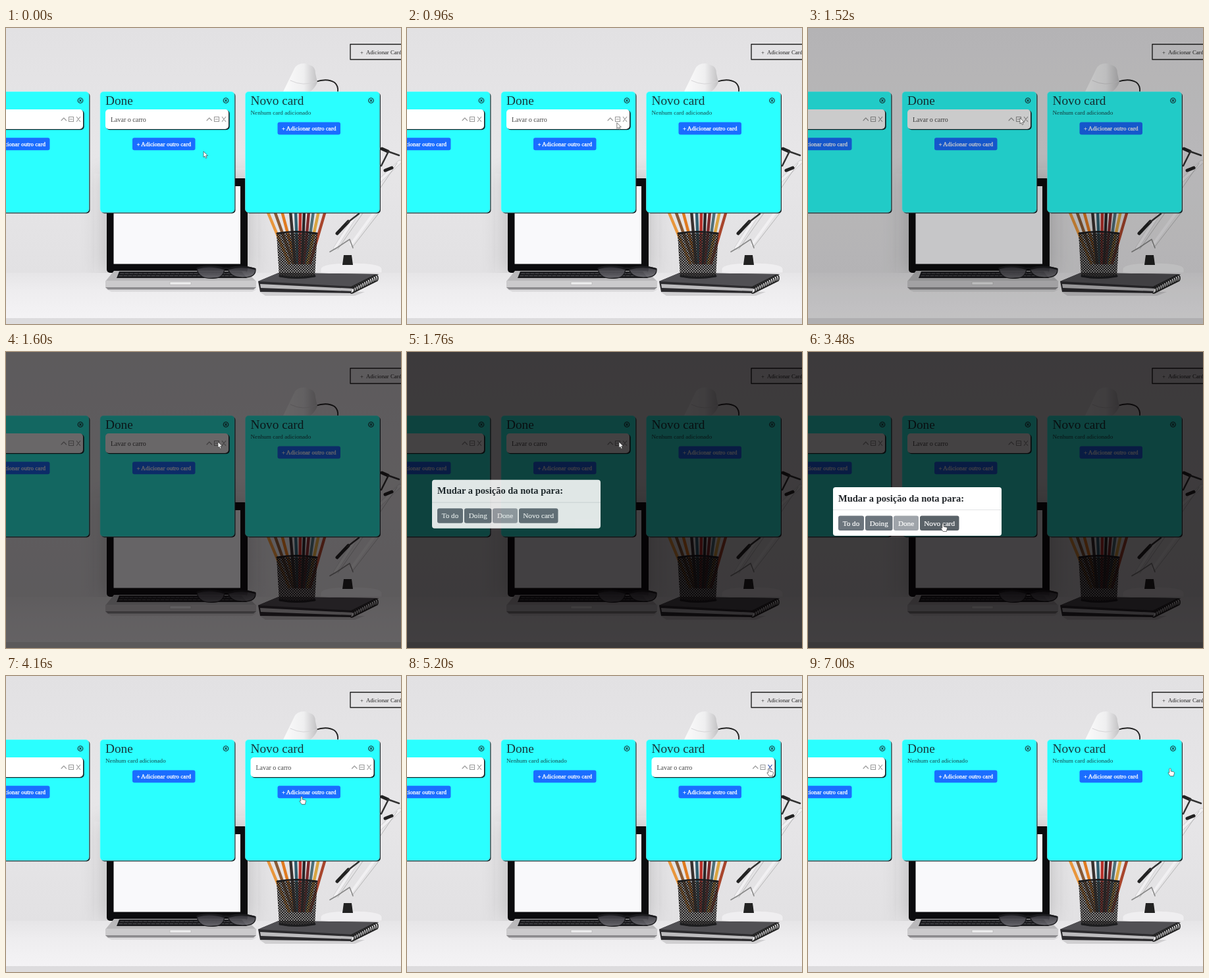
These frames come from a looping animation (600x451 px, 7.52 s). An HTML page:

```html
<!DOCTYPE html>
<html lang="pt">
<head>
<meta charset="utf-8">
<style>
html, body { margin: 0; width: 100%; height: 100%; overflow: hidden }
svg { display: block; width: 100%; height: 100%; font-family: "Liberation Serif", serif }
.line { fill: none; stroke-linecap: round; stroke-linejoin: round }
</style>
</head>
<body>
<svg id="stage" viewBox="0 0 600 451">
  <defs>
    <linearGradient id="wall" x2="0" y2="1"><stop stop-color="#e2e1e3"/><stop offset=".5" stop-color="#e7e6e8"/><stop offset="1" stop-color="#e2e1e3"/></linearGradient>
    <linearGradient id="desk" x2="0" y2="1"><stop stop-color="#e6e5e7"/><stop offset=".35" stop-color="#eeedef"/><stop offset="1" stop-color="#f5f4f6"/></linearGradient>
    <linearGradient id="shade"><stop stop-color="#fbfbfb"/><stop offset=".6" stop-color="#efeff0"/><stop offset="1" stop-color="#c2c1c3"/></linearGradient>
    <linearGradient id="lens" x2="0" y2="1"><stop stop-color="#333238"/><stop offset="1" stop-color="#6b6a70"/></linearGradient>
    <filter id="blur" x="-30%" y="-30%" width="160%" height="160%"><feGaussianBlur stdDeviation="14"/></filter>
    <pattern id="mesh" width="4" height="4" patternUnits="userSpaceOnUse"><path d="M0 0L4 4M4 0L0 4" stroke="#222" stroke-width="1"/></pattern>
  </defs>

  <g id="photo">
    <path fill="url(#wall)" d="M0 0H600V380H0z"/>
    <path fill="#444" fill-opacity=".17" filter="url(#blur)" d="M143 222H374V372H143z"/>
    <path fill="url(#desk)" d="M0 373H600V451H0z"/>
    <path fill="#dddcde" d="M0 442H600V451H0z"/>

    <!-- lamp -->
    <path class="line" stroke="#222" stroke-width="1.8" d="M470 82Q488 76 499 83Q505 88 504 97"/>
    <path fill="url(#shade)" d="M421 97L438 62Q442 53 455 54L465 58Q470 61 470 69L473 83Q469 92 462 97z"/>
    <path class="line" stroke="#d6d5d7" d="M432 80Q452 90 472 81"/>
    <g class="line">
      <path stroke="#d4d3d5" stroke-width="6" d="M598 204L560 240L500 335"/>
      <path stroke="#f1f0f2" stroke-width="4" d="M598 204L560 240L500 335M566 272L524 330"/>
      <path stroke="#aaa" stroke-width=".8" d="M594 206L563 252L504 337M568 280L527 333"/>
      <path stroke="#222" stroke-width="5" d="M571 184L580 188M576 217L586 213M503 313L520 295"/>
      <path stroke="#333" stroke-width="2.5" d="M580 188L597 194M570 210L580 190M518 297L536 283"/>
      <path stroke="#888" stroke-width="1.6" d="M492 341L504 334L522 322L527 335"/>
    </g>
    <path fill="#efeef0" stroke="#dddcde" stroke-width=".6" d="M478 367Q480 358 524 358Q570 358 571 367V373H478z"/>
    <path fill="#222" d="M513 346H525L527 361H511z"/>

    <!-- laptop -->
    <path fill="#dcdbdd" d="M152 398H381L374 402H160z"/>
    <rect x="153" y="229" width="214" height="144" rx="5" fill="#0c0c0e"/>
    <path fill="#f9f9fb" d="M163.5 241H356V359.5H163.5z"/>
    <path fill="#b9b8ba" d="M164 370H364L380 386H151z"/>
    <path fill="#1c1c1f" d="M172 371H358L366 381H168z"/>
    <path class="line" stroke="#66666a" stroke-width=".7" stroke-dasharray="5 2" d="M174 374H356M172 377.5H360"/>
    <path fill="#cbcacc" d="M151 385H380V394Q380 398 374 398H157Q151 398 151 394z"/>
    <path fill="#8b8a8d" d="M151 395H380L376 398.5H155z"/>
    <path fill="#ededee" stroke="#aaa" stroke-width=".5" d="M249 387H281V391H249z"/>

    <!-- notebook -->
    <path fill="#d0cfd1" d="M385 402H545L530 408H394z"/>
    <path fill="#2c2b2e" d="M383 386L414 373L566 375L526 398L524 404L386 402z"/>
    <path fill="#515054" d="M383 386L414 373L566 375L530 394z"/>
    <path fill="#bcbbbd" d="M386 390L526 397V401L387 396z"/>
    <g id="spiral" class="line" stroke="#222" stroke-width="1.7"></g>

    <!-- glasses -->
    <g fill="url(#lens)" fill-opacity=".92" stroke="#1b1b1e" stroke-width="1.3">
      <path d="M290 366Q309 359 332 366Q331 380 318 381Q292 384 290 366z"/>
      <path d="M337 366Q358 360 379 367Q380 380 362 380Q340 381 337 366z"/>
      <path class="line" stroke-width="2.4" d="M291 366Q309 360 331 367Q334 365 338 367Q358 361 378 367"/>
    </g>

    <!-- pencils and cup -->
    <g id="pencils" class="line"></g>
    <path fill="#2a2523" fill-opacity=".5" d="M411 313H473L469 379Q441 384 415 379z"/>
    <path fill="url(#mesh)" d="M411 313H473L469 379Q441 384 415 379z"/>
    <path class="line" stroke="#1c1c1e" stroke-width="3" d="M412 313Q441 308 472 313M416 378Q441 383 469 378"/>
  </g>

  <path class="line" stroke="#222" stroke-width="1.4" d="M605 24.7H523V48H605"/>
  <text x="538" y="39.5" font-size="8.7" fill="#222">+</text>
  <text x="547" y="39.5" font-size="8.7" fill="#222">Adicionar Card</text>
  <g id="cards"></g>
  <rect id="backdrop" width="600" height="451" fill="#040002"/>
  <g id="modal">
    <rect x="38" y="206" width="256" height="74" rx="4" fill="#fff"/>
    <text x="46" y="227.5" font-size="14.5" font-weight="700" fill="#212529">Mudar a posição da nota para:</text>
    <path stroke="#e3e4e6" d="M38 240.5H294"/>
    <g id="choices"></g>
  </g>
  <g id="cursor" fill="#fff" stroke="#333" stroke-width=".65" stroke-linejoin="round">
    <path id="arrow" d="M0 0V9L2 7.2L3.4 10.4L5 9.7L3.6 6.6H6.5z"/>
    <path id="hand" d="M-1.2 1Q0-.8 1.2 1V4.6L5.6 5.6Q6.7 6 6.5 7.4L5.6 10.6V12H.2L-3 7.4Q-3 5.9-1.2 6.8z"/>
  </g>
</svg>
<script>
const LOOP = 7520, OPEN = 1480, PICK = 3500, REMOVE = 5600;
const $ = id => document.getElementById(id);
const set = (el, attrs) => { for (const k in attrs) el.setAttribute(k, attrs[k]); };
const show = (el, on) => el.setAttribute('display', on ? 'inline' : 'none');
const clamp = v => Math.max(0, Math.min(1, v));
const ramp = (t, start, length) => clamp((t - start) / length);
const easeOut = u => 1 - (1 - u) ** 1.7;

// colour, x at the tip, x inside the cup
const pencils = [['#e8963c', 397, 430], ['#8a5a34', 408, 436], ['#e07a1f', 419, 440], ['#39302e', 432, 439],
  ['#2f5f70', 440, 443], ['#b8302a', 447, 446], ['#2c2628', 453, 450], ['#7c2a2c', 460, 453],
  ['#4e6f78', 467, 456], ['#d9a441', 475, 458], ['#a8452c', 485, 462]];
$('pencils').innerHTML = pencils.map(([colour, top, foot]) =>
  `<path stroke="${colour}" stroke-width="4.4" d="M${top} 279L${foot} 358"/>`).join('');
$('spiral').innerHTML = Array.from({ length: 13 }, (_, i) =>
  `<path d="M${523 + i * 3} ${395 - i * 1.5}q6-2 6 4t-5 5"/>`).join('');

const card = (x, title) => `<g transform="translate(${x} 0)">
  <rect x="1.5" y="98.5" width="204" height="184" rx="5" fill="#17282c"/>
  <rect class="face" y="97" width="204" height="184" rx="5" stroke="#8ff" stroke-width=".6"/>
  <text x="8" y="117" font-size="19.3" fill="#17383c">${title}</text>
  <g class="line" stroke="#17282c" stroke-width="1.1"><circle cx="191" cy="110.5" r="3.8"/><path d="M189.6 109.1l2.8 2.8m0-2.8l-2.8 2.8"/></g>
  <text class="empty" x="8" y="131.5" font-size="9.15" fill="#17484c">Nenhum card adicionado</text>
  <g class="note">
    <rect x="9.2" y="125.3" width="187.5" height="30" rx="5" fill="#17282c"/>
    <rect x="8" y="124" width="187" height="30" rx="5" fill="#fff"/>
    <text x="16" y="142.5" font-size="10" fill="#444">Lavar o carro</text>
    <g class="line" stroke="#999" stroke-width="1.1">
      <path d="M162 141l3.8-4 3.8 4M173.5 135.5h7v7h-7zM175.2 139h3.6"/>
      <path class="cross" d="M185.3 135.5l5.4 7m0-7l-5.4 7"/>
    </g>
  </g>
  <g class="add"><rect x="49" y="143.5" width="95.5" height="19" rx="3" fill="#1a6dff"/>
  <text x="96.7" y="156" font-size="9.08" text-anchor="middle" fill="#fff" stroke="#fff" stroke-width=".3">+ Adicionar outro card</text></g>
</g>`;
$('cards').innerHTML = card(-78, 'Doing') + card(143, 'Done') + card(363.5, 'Novo card');

$('choices').innerHTML = [['To do', 46, 39], ['Doing', 87, 41.5], ['Done', 130, 38], ['Novo card', 170, 59.5]].map(([label, x, w]) =>
  `<g opacity="${label == 'Done' ? .65 : 1}"><rect x="${x}" y="249.5" width="${w}" height="22.5" rx="3" fill="#6c757d"/>
  <text x="${x + w / 2}" y="264.5" font-size="11.2" text-anchor="middle" fill="#fff" stroke="#fff" stroke-width=".2">${label}</text></g>`).join('');

const cards = [...$('cards').children].map(g => Object.fromEntries(
  ['face', 'empty', 'note', 'add', 'cross'].map(c => [c, g.querySelector('.' + c)])));
const novoChoice = $('choices').lastElementChild.firstElementChild;

// time, x, y
const route = [[0, 300, 188], [40, 300, 188], [1250, 322, 137], [1880, 322, 137], [2300, 292, 186],
  [3000, 205, 261.5], [3560, 205, 261.5], [4150, 449, 183.5], [4180, 449, 183.5], [5000, 550, 140.5], [LOOP, 550, 140.5]];
function cursorAt(t) {
  const i = route.findIndex(p => p[0] > t), [t0, x0, y0] = route[i - 1], [t1, x1, y1] = route[i];
  let u = (t - t0) / (t1 - t0);
  u = u * u * (3 - 2 * u);
  return [x0 + (x1 - x0) * u, y0 + (y1 - y0) * u];
}

function draw(t) {
  const dark = ramp(t, OPEN, 150) - ramp(t, PICK + 150, 150);
  const seen = ramp(t, OPEN + 150, 150) - ramp(t, PICK, 150);
  const drop = easeOut(ramp(t, OPEN + 150, 300)) - easeOut(ramp(t, PICK, 300));
  set($('backdrop'), { opacity: dark * .74 });
  set($('modal'), { opacity: seen, transform: `translate(0 ${-30 * (1 - drop)})` });

  const filled = [true, t < PICK, t >= PICK && t < REMOVE];
  cards.forEach((c, i) => {
    show(c.note, filled[i]);
    show(c.empty, !filled[i]);
    set(c.add, { transform: `translate(0 ${filled[i] ? 23.7 : 0})` });
    set(c.face, { fill: `rgb(42,255,${255 - 20 * dark})` });
  });
  set(cards[2].cross, { stroke: t > 4850 ? '#1a3fa0' : '#999' });
  set(novoChoice, { fill: t > 2850 ? '#5a6268' : '#6c757d' });

  const hand = t > 2800 && t < 3640 || t > 4080 && t < 4240 || t > 4800;
  show($('hand'), hand);
  show($('arrow'), !hand);
  set($('cursor'), { transform: `translate(${cursorAt(t)})` });
}

function tick() {
  draw(performance.now() % LOOP);
  requestAnimationFrame(tick);
}
tick();
</script>
</body>
</html>
```
